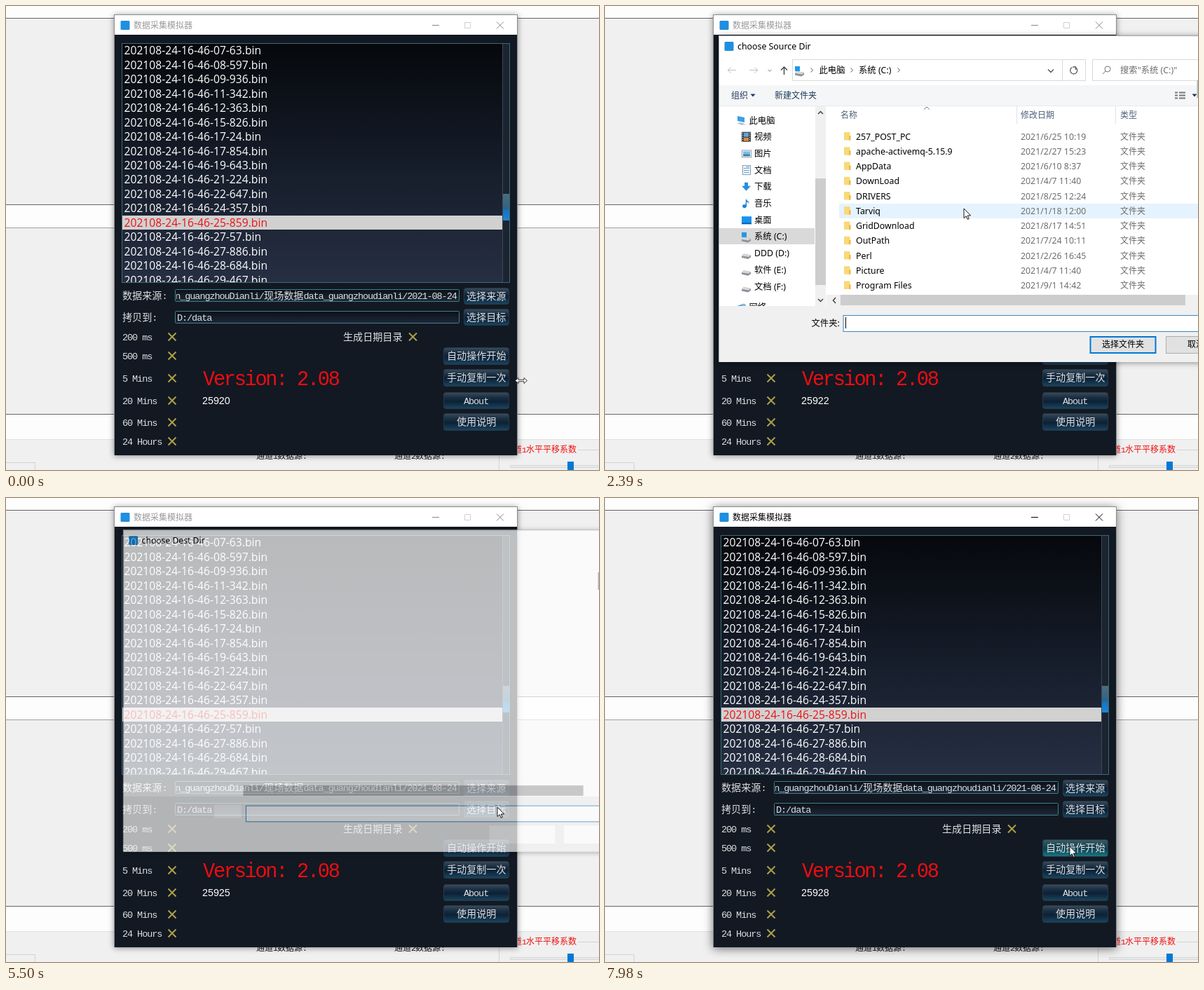
An HTML page that plays this animation: 846x662 px, repeating every 8000 ms.

```html
<!DOCTYPE html>
<html lang="zh-CN">
<head>
<meta charset="utf-8">
<style>
html, body { margin: 0; width: 100%; height: 100%; overflow: hidden; background: #f0f0f0; }
svg { display: block; width: 846px; height: 662px; cursor: default; }
text { white-space: pre; }
.ui { font: 12.35px "Noto Sans", "Noto Sans CJK SC", "Noto Sans CJK", sans-serif; }
.zh { font: 12px "Noto Sans CJK SC", "Noto Sans CJK", sans-serif; }
.list { font: 15.65px "Open Sans", "Noto Sans", sans-serif; fill: #fff; }
.count { font: 14.3px "Liberation Sans", Arial, sans-serif; fill: #fff; }
.half { font-family: "Liberation Mono", "Courier New", monospace; }
.full { font-family: "Noto Sans CJK SC", "Noto Sans CJK", sans-serif; font-weight: 300; }
.line { fill: none; stroke-width: 1; }
.win { filter: drop-shadow(0 1px 4px rgba(0,0,0,.42)); }
.win.active { filter: drop-shadow(0 2px 7px rgba(0,0,0,.55)); }
#dialog { transform-origin: 515px 275px; }
</style>
</head>
<body>
<svg id="stage" viewBox="0 0 846 662" xmlns="http://www.w3.org/2000/svg"></svg>
<script>
const LOOP = 8000;
const stage = document.getElementById('stage');

// ---- drawing helpers ----
const rect = (x, y, w, h, fill, more = '') =>
  `<rect x="${x}" y="${y}" width="${w}" height="${h}" fill="${fill}" ${more}/>`;
const box = (x, y, w, h, fill, stroke, more = '') =>
  rect(x + .5, y + .5, w - 1, h - 1, fill, `stroke="${stroke}" ${more}`);
const line = (d, stroke, more = '') => `<path class="line" d="${d}" stroke="${stroke}" ${more}/>`;
const shape = (d, fill) => `<path d="${d}" fill="${fill}"/>`;
const text = (x, y, s, cls = 'ui', fill = '#000', more = '') =>
  `<text x="${x}" y="${y}" class="${cls}" fill="${fill}" ${more}>${s}</text>`;

// Half-width Latin next to full-width Chinese, on a fixed cell
function mono(x, y, s, fill = '#dcdfe2', size = 14.1) {
  return s.match(/[\x00-\x7f]+|[^\x00-\x7f]+/g).map(run => {
    const latin = run.charCodeAt(0) < 128;
    const px = latin ? size * .96 : size;
    const gap = latin ? size * .5 - px * .6 : 0;
    const out = text(x, y, run, latin ? 'half' : 'full', fill,
      `font-size="${px}" letter-spacing="${gap}"`);
    x += run.length * size * (latin ? .5 : 1);
    return out;
  }).join('');
}

const gradient = (id, ...stops) => `<linearGradient id="${id}" x2="0" y2="1">` +
  stops.map(([at, c]) => `<stop offset="${at}" stop-color="${c}"/>`).join('') + '</linearGradient>';

const defs = '<defs>' +
  gradient('listBg', [0, '#06080c'], [.5, '#151c29'], [1, '#262f43']) +
  gradient('field', [0, '#0b1119'], [1, '#1d2838']) +
  gradient('btn', [0, '#3b4c5a'], [.3, '#1b2f42'], [.55, '#0c2136'], [1, '#1b4560']) +
  gradient('btnHot', [0, '#3f5a64'], [.3, '#204c59'], [.55, '#0f414f'], [1, '#1b7784']) +
  gradient('thumb', [0, '#4d6c7e'], [.55, '#2f6385'], [.6, '#1672bd'], [1, '#1e86d6']) +
  '<clipPath id="listClip"><rect x="166" y="54" width="542" height="340"/></clipPath>' +
  '<clipPath id="pathClip"><rect x="243" y="405" width="403" height="18"/></clipPath></defs>';

// ---- desktop behind ----
function desktop() {
  let s = rect(0, 0, 846, 662, '#f0f0f0');
  s += rect(0, 0, 846, 17, '#fdfdfd') + rect(0, 284, 846, 32, '#fdfdfd') + rect(0, 583, 846, 35, '#fdfdfd');
  s += line('M0 17.5H846M0 283.5H846M0 582.5H846', '#646464');
  s += line('M0 316.5H846', '#a0a0a0') + line('M0 618.5H846', '#e0e0e0');
  s += line('M0 651.5H41.5V662M703.5 640V662M816 633.5H846', '#d3d3d3');
  s += mono(357, 646, '通道1数据源:', '#111', 12) + mono(554, 646, '通道2数据源:', '#111', 12);
  s += mono(712, 637, '通道1水平平移系数', '#f01010', 12);
  s += box(719, 655, 140, 4, '#e7eaea', '#d6d6d6') + rect(801, 650, 9, 12, '#0078d7');
  return s;
}

// ---- main window ----
const files = ['07-63', '08-597', '09-936', '11-342', '12-363', '15-826', '17-24', '17-854', '19-643',
  '21-224', '22-647', '24-357', '25-859', '27-57', '27-886', '28-684', '29-467'];
const buttons = [
  [653, 402, 65, 24, '选择来源', 657], [653, 432, 65, 24, '选择目标', 657],
  [624, 487, 94, 25, '自动操作开始', 629], [624, 518, 94, 25, '手动复制一次', 629],
  [624, 551, 94, 24, 'About', 653], [624, 581, 94, 25, '使用说明', 643]];
const periods = [['200 ms', 472], ['500 ms', 499], ['5 Mins', 531], ['20 Mins', 563], ['60 Mins', 594], ['24 Hours', 621]];
const tick = (x, y) => line(`M${x - 5.5} ${y - 5.5}l11 11m0-11l-11 11`, '#aba04a', 'style="stroke-width:2"');

function mainWindow() {
  let s = rect(154, 12, 576, 629, '#8a8d90', 'id="frame" class="win"');
  s += rect(155, 13, 574, 28, '#fff') + rect(155, 41, 574, 600, '#121922');
  s += rect(163.5, 21, 13, 13, '#1f8fe0', 'rx="1.5"');
  s += text(182, 32, '数据采集模拟器', 'zh', '#999', 'id="title"');
  s += line('M654.5 23.5h8v8h-8z', '#d0d0d0');
  s += line('M608 27.5h10M700 22.5l10 10m0-10l-10 10', '#888', 'id="controls"');

  s += box(165, 53, 554, 342, 'url(#listBg)', '#3d6973') + '<g clip-path="url(#listClip)">';
  files.forEach((f, i) => {
    const y = 54 + i * 20.46, picked = i === 12;
    if (picked) s += rect(166, 299, 542, 20, '#d1d1d1');
    s += text(168.5, y + 15.3, `202108-24-16-46-${f}.bin`, 'list', '', picked ? 'style="fill:#f01010"' : '');
  });
  s += '</g>' + rect(708, 54, 10, 340, '#1b2430') + line('M708.5 54V394', '#3a4a57') + rect(709, 268, 9, 38, 'url(#thumb)');

  s += mono(166, 418, '数据来源:') + mono(166, 449, '拷贝到:');
  s += box(241, 404, 406, 18, 'url(#field)', '#447d8a', 'rx="1"') + box(241, 435, 406, 18, 'url(#field)', '#447d8a', 'rx="1"');
  s += `<g clip-path="url(#pathClip)">${mono(241.2, 418, 'n_guangzhouDianli/现场数据data_guangzhoudianli/2021-08-24')}</g>`;
  s += mono(244, 449, 'D:/data');
  periods.forEach(([label, y]) => s += mono(166, y + 4.5, label) + tick(237, y));
  s += mono(481, 476.5, '生成日期目录') + tick(580.5, 472);
  s += mono(281, 541, 'Version: 2.08', '#ee0c12', 29.8);
  s += text(280, 568, '25920', 'count', '', 'id="count"');
  buttons.forEach(([x, y, w, h, label, tx], i) =>
    s += box(x, y, w, h, 'url(#btn)', '#24394a', `rx="3" id="btn${i}"`) + mono(tx, y + 16.5, label));
  return s;
}

// ---- folder dialog ----
const rows = [['257_POST_PC', '2021/6/25 10:19'], ['apache-activemq-5.15.9', '2021/2/27 15:23'], ['AppData', '2021/6/10 8:37'],
  ['DownLoad', '2021/4/7 11:40'], ['DRIVERS', '2021/8/25 12:24'], ['Tarviq', '2021/1/18 12:00'],
  ['GridDownload', '2021/8/17 14:51'], ['OutPath', '2021/7/24 10:11'], ['Perl', '2021/2/26 16:45'],
  ['Picture', '2021/4/7 11:40'], ['Program Files', '2021/9/1 14:42']];
const places = ['此电脑', '视频', '图片', '文档', '下载', '音乐', '桌面', '系统 (C:)', 'DDD (D:)', '软件 (E:)', '文档 (F:)', '网络'];
const ROW = 21.25, LIST_TOP = 175.4;

const drive = (x, y) => shape(`M${x} ${y + 1}l3-3 10 2v3l-4 2.5-9-2z`, '#8d9299') + shape(`M${x} ${y + 1}l3-3 10 2-3 2.5z`, '#d5d8db');
const dataDrive = (x, y) => drive(x, y + 3);
const sysDrive = (x, y) => drive(x, y + 3) + rect(x, y - 6, 7, 7, '#1a9be8');
const placeIcons = [
  (x, y) => shape(`M${x - 6} ${y - 6}l10 2v7l-10-2z`, '#3a9fe6') + shape(`M${x - 7} ${y + 4}l6-1 7 3-6 1z`, '#b9c3cb'),
  (x, y) => rect(x, y - 7, 13, 14, '#2b3038') + rect(x + 3, y - 6, 7, 6, '#5aa7e0') + rect(x + 3, y + 1, 7, 5, '#e08a3c') +
    line(`M${x + 1.5} ${y - 6}v13M${x + 11.5} ${y - 6}v13`, '#fff', 'stroke-dasharray="1.5 1.5"'),
  (x, y) => box(x, y - 5, 14, 11, '#fff', '#8a9aa8') + rect(x + 2, y - 3, 10, 4, '#6cc0f0') + rect(x + 2, y + 1, 10, 3, '#3b7d9d'),
  (x, y) => box(x + 1, y - 7, 12, 14, '#fff', '#8496a5') + line(`M${x + 3} ${y - 2.5}h8m-8 3h8m-8 3h8M${x + 6} ${y - 4.5}h5`, '#4a9ad4'),
  (x, y) => shape(`M${x + 4} ${y - 6}h5v5h4l-6.5 7-6.5-7h4z`, '#2c8de0'),
  (x, y) => shape(`M${x + 6} ${y - 7}c1 4 6 4 4 8 0-2-1-3-3-3v6a3 2.5 0 1 1-1.5-2z`, '#1b82d8'),
  (x, y) => rect(x, y - 5, 14, 11, '#1695ee') + rect(x, y + 4, 14, 2, '#0f5fa8'),
  sysDrive, dataDrive, dataDrive, dataDrive,
  (x, y) => shape(`M${x - 6} ${y - 2}l9-3v8l-9-1z`, '#3a9fe6') + rect(x, y - 5, 6, 6, '#8cb4cc', 'rx="3"')];
const chevron = (x, y) => line(`M${x - 1.5} ${y - 3}l3 3-3 3`, '#555');
const down = (x, y, c, r = 4) => line(`M${x - r} ${y - r / 2}l${r} ${r} ${r}-${r}`, c, 'style="stroke-width:1.4"');
const caretDown = (x, y, c) => shape(`M${x - 3.5} ${y - 1.5}h7l-3.5 4z`, c);

function dialogContent() {
  const grey = '#6d6d6d', head = '#4c607a';
  let s = line('M175 91.5h12m-12 0l4.5-4m-4.5 4l4.5 4M206 91.5h12m0 0l-4.5-4m4.5 4l-4.5 4', '#c0c0c0');
  s += down(235, 92, '#bbb', 2.5) + line('M255.5 98V87m-4.5 4.5l4.5-4.5 4.5 4.5', '#444', 'style="stroke-width:1.4"');
  s += box(267, 76, 386, 31, '#fff', '#d9d9d9') + box(652, 76, 34, 31, '#fff', '#d9d9d9') + box(695, 76, 180, 31, '#fff', '#d9d9d9');
  s += sysDrive(271, 92) + chevron(295, 91.5) + text(305.5, 96, '此电脑') + chevron(352, 91.5) + text(362, 96, '系统 (C:)') + chevron(419, 91.5);
  s += down(636, 92.5, '#555') + line('M671 87.5a5 5 0 1 1-4.5 0M671.5 91v-4h-4', '#555', 'style="stroke-width:1.3"');
  s += '<circle cx="717" cy="90" r="4" fill="none" stroke="#777"/>' + line('M714 93l-4 4', '#777') + text(735, 96, '搜索"系统 (C:)"', 'ui', grey);
  s += rect(163, 113, 705, 30, '#f5f6f7') + line('M163 142.5H868', '#e8eaec');
  s += text(180, 132, '组织', 'zh', '#1e395b') + caretDown(211, 127, '#1e395b') + text(242, 132, '新建文件夹', 'zh', '#1e395b');
  s += line('M813 123.5h4m2 0h9M813 127.5h4m2 0h9M813 131.5h4m2 0h9', '#777', 'style="stroke-width:2"') + caretDown(841, 127, '#1e395b');

  s += rect(163, 317, 136, 23, '#d9d9d9');
  places.forEach((p, i) => {
    const y = 163 + i * 23.7 + (i === 11 ? 6 : 0), top = i === 0 || i === 11;
    s += placeIcons[i](195, y) + text(top ? 205.5 : 213, y + 4.5, p);
  });
  s += rect(300, 143, 15, 285, '#f0f0f0') + rect(300, 246, 15, 152, '#cdcdcd');
  s += line('M304 154l3.5-3.5 3.5 3.5M304 418l3.5 3.5 3.5-3.5', '#444', 'style="stroke-width:1.5"');

  s += line('M455 147.5l4-3.5 4 3.5', '#777') + line('M587.5 143V168M728.5 143V168', '#e2e2e2');
  s += text(336, 160, '名称', 'zh', head) + text(593, 160, '修改日期', 'zh', head) + text(735, 160, '类型', 'zh', head) + text(855, 160, '大小', 'zh', head);
  s += rect(334, 0, 534, 21, '#e5f3ff', 'id="rowHot"');
  rows.forEach(([name, date], i) => {
    const y = 186 + i * ROW;
    s += rect(341, y - 6, 8.5, 11.5, '#f9d978') + rect(348, y - 1, 2.5, 6.5, '#e8b84a');
    s += text(358, y + 4.5, name) + text(593, y + 4.5, date, 'ui', grey) + text(735, y + 4.5, '文件夹', 'zh', grey);
  });
  s += rect(316, 412, 552, 16, '#f0f0f0') + rect(336, 412, 492, 15, '#cdcdcd') + line('M329 416l-3.5 4 3.5 4', '#444', 'style="stroke-width:1.5"');
  s += rect(163, 428, 705, 80, '#f0f0f0');
  s += text(294.5, 457, '文件夹:') + rect(691.5, 471, 95, 25, '#0078d7') + rect(693.5, 473, 91, 21, '#e1e1e1') + text(709, 487, '选择文件夹', 'zh');
  s += box(800, 471, 95, 25, '#e1e1e1', '#adadad', 'id="cancel"') + text(831, 487, '取消', 'zh');
  return s;
}

function dialog() {
  const skeleton = rect(163, 428, 705, 80, '#f0f0f0') + rect(336, 412, 492, 15, '#b9b9b9') +
    rect(294, 440, 39, 19, '#fff') + rect(692, 470, 95, 26, '#fff') + rect(800, 470, 95, 26, '#fff');
  return rect(162, 42, 706, 466, '#fff', 'class="win"') + line('M162.5 508V42.5H868M162 507.5H868', '#a0a5aa') +
    rect(170.5, 51, 13, 13, '#1f8fe0', 'rx="1.5"') + text(189, 62, '', 'ui', '#000', 'id="dlgTitle"') +
    `<g id="skeleton">${skeleton}</g><g id="content">${dialogContent()}</g>` +
    box(339.5, 441, 540, 24, '#fff', '#3a87c4') + line('M343.5 444V460', '#000', 'id="caret"');
}

const pointers = '<g id="pointer">' +
  '<path id="arrow" d="M0 0V13.6L3.2 10.7 5.3 15.4 7.3 14.5 5.2 10H9.6Z" fill="#fff" stroke="#000" stroke-width=".9"/>' +
  '<g id="cross">' + line('M-8.5 0H8.5M0-8.5V8.5', '#fff', 'style="stroke-width:3"') + line('M-8 0H8M0-8V8', '#000', 'style="stroke-width:1.6"') + '</g>' +
  '<path id="resize" d="M-8.5 .5L-4-3.5V-.7H4V-3.5L8.5 .5 4 4.5V1.7H-4V4.5Z" fill="#fff" stroke="#222" stroke-width=".9"/></g>';

stage.innerHTML = defs + desktop() + mainWindow() +
  `<g id="dialog">${dialog()}</g>` + rect(844.5, 106, 1.5, 25, '#b5b5b5', 'id="edge"') + pointers;

// ---- timeline ----
const el = {};
stage.querySelectorAll('[id]').forEach(e => el[e.id] = e);
const show = (e, on) => e.setAttribute('visibility', on ? 'inherit' : 'hidden');
const within = (t, a, b) => t >= a && t < b;

const path = [[280, 735, 534], [1030, 678, 409], [1770, 678, 409], [2350, 512, 289], [2460, 512, 289], [2530, 511, 283],
  [2700, 511, 283], [3420, 838, 482], [3900, 838, 482], [4240, 822, 476], [4400, 822, 476], [5000, 701, 441],
  [5600, 701, 441], [6020, 731, 293], [6280, 731, 293], [6800, 823, 472], [7200, 823, 472], [7500, 661, 492],
  [7680, 661, 492], [7920, 663, 497]];
const fade = [[0, 0], [1640, .25], [1730, .6], [1770, .9], [1840, 1], [3620, .6], [3720, .22], [3790, 0],
  [5420, .35], [5500, .72], [5600, 1], [6850, .6], [6930, .2], [7000, 0]];

function pointerAt(t) {
  const i = path.findIndex(k => k[0] > t);
  if (i === 0) return path[0].slice(1);
  if (i < 0) return path[path.length - 1].slice(1);
  const [ta, xa, ya] = path[i - 1], [tb, xb, yb] = path[i];
  const p = (t - ta) / (tb - ta), e = p * p * (3 - 2 * p);
  return [xa + (xb - xa) * e, ya + (yb - ya) * e];
}

function render(t) {
  const opacity = fade.filter(k => k[0] <= t).pop()[1];
  const second = t > 4500;
  const loaded = within(t, 1840, 3790) || within(t, 5600, 7000);
  const open = opacity === 1;
  const active = within(t, 1140, 1300) || within(t, 3790, 5060) || t >= 7000;
  const modal = within(t, 1470, 3790) || within(t, 5110, 7000);

  // The screen was sampled about every 77 ms
  const step = t < 280 ? 0 : 280 + Math.floor((t - 280) / 77) * 77;
  const [x, y] = pointerAt(step);

  el.count.textContent = 25920 + Math.floor((t + 250) / 1000);
  el.title.setAttribute('fill', active ? '#000' : '#999');
  el.controls.setAttribute('stroke', active ? '#000' : '#888');
  el.frame.classList.toggle('active', active);
  buttons.forEach(([bx, by, w, h], i) => {
    const hot = !modal && x >= bx && x < bx + w && y >= by && y < by + h;
    el['btn' + i].setAttribute('fill', hot ? 'url(#btnHot)' : 'url(#btn)');
  });

  show(el.dialog, opacity > 0);
  show(el.edge, opacity > 0);
  el.dialog.style.opacity = opacity;
  el.dialog.style.transform = `scale(${.95 + .05 * opacity})`;
  el.dlgTitle.textContent = second ? 'choose Dest Dir' : 'choose Source Dir';
  show(el.skeleton, !loaded);
  show(el.content, loaded);
  show(el.caret, loaded && (t - (second ? 5700 : 1920) + 1060) % 1060 < 530);

  const row = Math.floor((y - LIST_TOP) / ROW);
  show(el.rowHot, open && loaded && x > 334 && row >= 0 && row < rows.length);
  el.rowHot.setAttribute('y', LIST_TOP + row * ROW + .2);
  const onCancel = loaded && x > 800 && y > 471 && y < 496;
  el.cancel.setAttribute('fill', onCancel ? '#e5f1fb' : '#e1e1e1');
  el.cancel.setAttribute('stroke', onCancel ? '#0078d7' : '#adadad');

  const kind = open || x < 728 ? 'arrow' : x < 738 ? 'resize' : 'cross';
  ['arrow', 'cross', 'resize'].forEach(k => show(el[k], k === kind));
  el.pointer.setAttribute('transform', `translate(${x.toFixed(1)} ${y.toFixed(1)})`);
}

const start = performance.now();
function loop() {
  render((performance.now() - start) % LOOP);
  requestAnimationFrame(loop);
}
loop();
</script>
</body>
</html>
```
